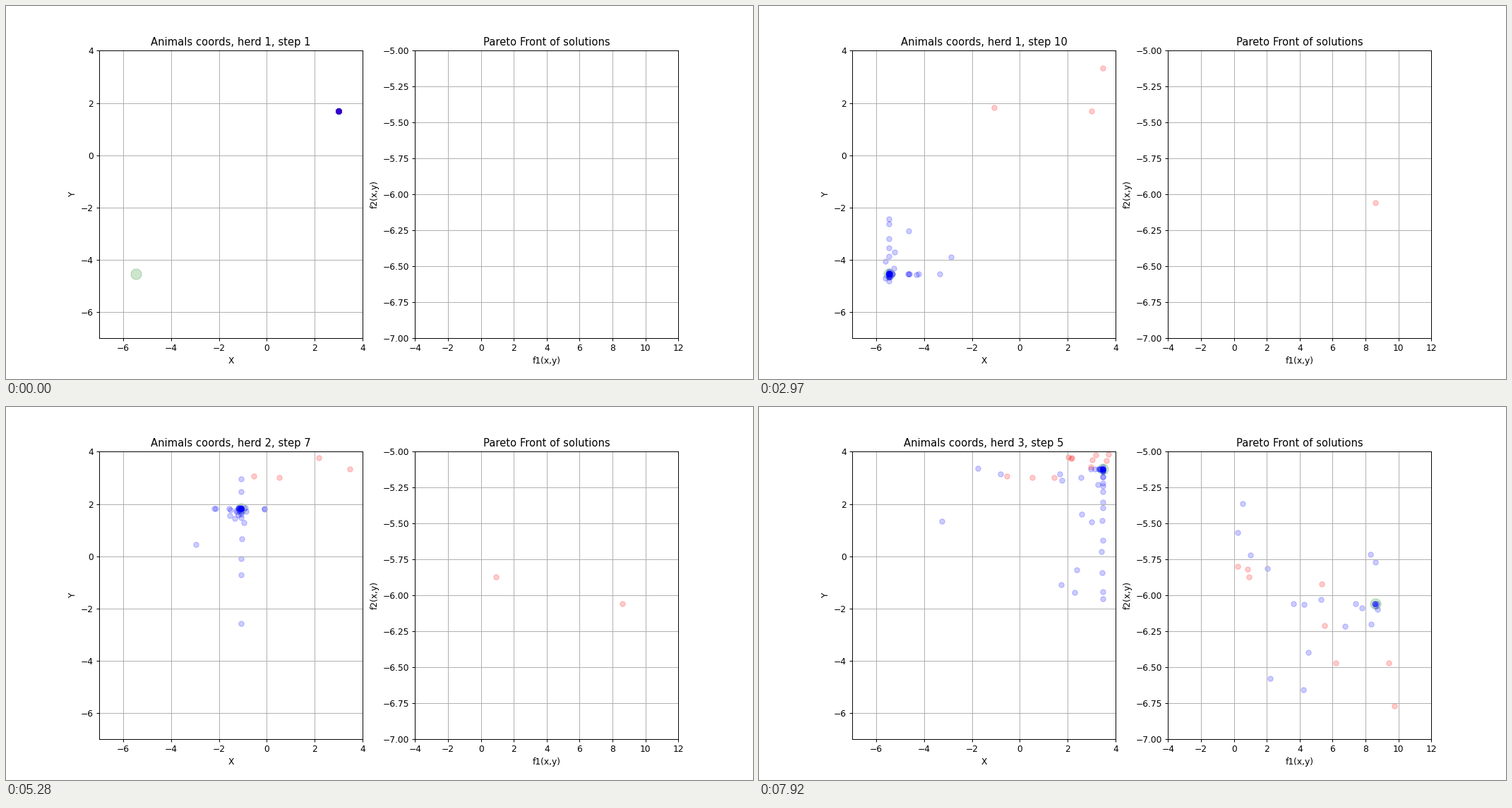
Write a matplotlib script that moves like this. It is 1058 by 529 pixels and loops after 8 s.

```python
import numpy as np
import matplotlib.pyplot as plt
from matplotlib.animation import FuncAnimation

W, H = 1058, 529
STEP_MS, TICK_MS, LOOP_MS = 330, 40, 8000
STEPS_PER_HERD = 10
HERD_SIZE, FRONT_SIZE = 44, 22

# Left plot: where each herd sets out and which point it gathers around.
STARTS = [(3.0, 1.69), (0.9, -0.1), (1.31, -2.38)]
GOALS = [(-5.48, -4.55), (-1.08, 1.83), (3.47, 3.33)]
AREA = (-7, -7), (4, 4)

# Right plot: the same in terms of f1 and f2.
FRONT = [(8.6, -6.06), (0.92, -5.87)]
FRONT_AREA = (-4, -7), (12, -5)

# Best solutions, in the order in which they are found.
EARLY = [(-0.55, 3.07), (0.52, 3.01), (2.17, 3.77)]
LATE = [(1.43, 3.01), (2.02, 3.8), (3.17, 3.88), (3.7, 3.9),
        (3.62, 3.66), (2.98, 3.42), (2.14, 3.74), (3.03, 3.69)]
FRONT_LATE = [(9.76, -6.77), (5.51, -6.21), (0.83, -5.82), (0.23, -5.8),
              (5.34, -5.92), (9.42, -6.47), (6.2, -6.47)]


def cloud(seed, goal, area, step, pull, count):
    """Animals scattered around the goal, closer to it with each step."""
    rng = np.random.default_rng(seed)
    low, high = np.array(area)
    reach = (1.05 - 0.075 * step) * rng.random((count, 2)) ** (pull * step)
    ahead = rng.random((count, 2)) < (high - goal) / (high - low)
    return goal + (np.where(ahead, high, low) - goal) * reach


def herd(n, step):
    """Herd positions in the left and in the right plot."""
    if step == 1:
        return [STARTS[n]] * HERD_SIZE, []
    seed = n * STEPS_PER_HERD + step
    animals = cloud(seed, GOALS[n], AREA, step, 0.65 + 0.2 * n, HERD_SIZE)
    if n == 2:
        return animals, cloud(seed + 50, FRONT[0], FRONT_AREA, step, 0.75,
                              FRONT_SIZE)
    return animals, FRONT[n:n + 1] if step == 2 else []


def best(n, step):
    """Best solutions so far; a herd makes its first finds at step 2."""
    searched = n if step > 1 else n - 1
    if searched < 0:
        return STARTS[:1], []
    if searched == 0:
        return STARTS[:1] + GOALS[1:], FRONT[:1]
    if searched == 1:
        return EARLY + GOALS[2:], FRONT
    found = 2 * (step - 1)
    return EARLY + LATE[:found], FRONT[1:] + FRONT_LATE[:found]


def layers(ax):
    ax.grid()
    return [ax.scatter([], [], s=size, c=color, alpha=0.2)
            for size, color in ((150, "green"), (36, "blue"), (36, "red"))]


fig, (left, right) = plt.subplots(1, 2, figsize=(12, 6), dpi=W / 12)
left.set(xlim=(-7, 4), ylim=(-7, 4), xlabel="X", ylabel="Y")
right.set(xlim=(-4, 12), ylim=(-7, -5), xlabel="f1(x,y)", ylabel="f2(x,y)",
          title="Pareto Front of solutions")
dots = list(zip(layers(left), layers(right)))


def draw(i):
    k = (i * TICK_MS + TICK_MS - 1) // STEP_MS
    n, step = k // STEPS_PER_HERD, k % STEPS_PER_HERD + 1
    left.set_title(f"Animals coords, herd {n + 1}, step {step}")
    goal = [GOALS[n]], FRONT[:1] if n == 2 else []
    for pair, places in zip(dots, (goal, herd(n, step), best(n, step))):
        for layer, points in zip(pair, places):
            layer.set_offsets(np.reshape(points, (-1, 2)))
    return [layer for pair in dots for layer in pair]


anim = FuncAnimation(fig, draw, frames=LOOP_MS // TICK_MS, interval=TICK_MS,
                     init_func=lambda: draw(0), repeat=True, repeat_delay=0)
plt.show()
```
